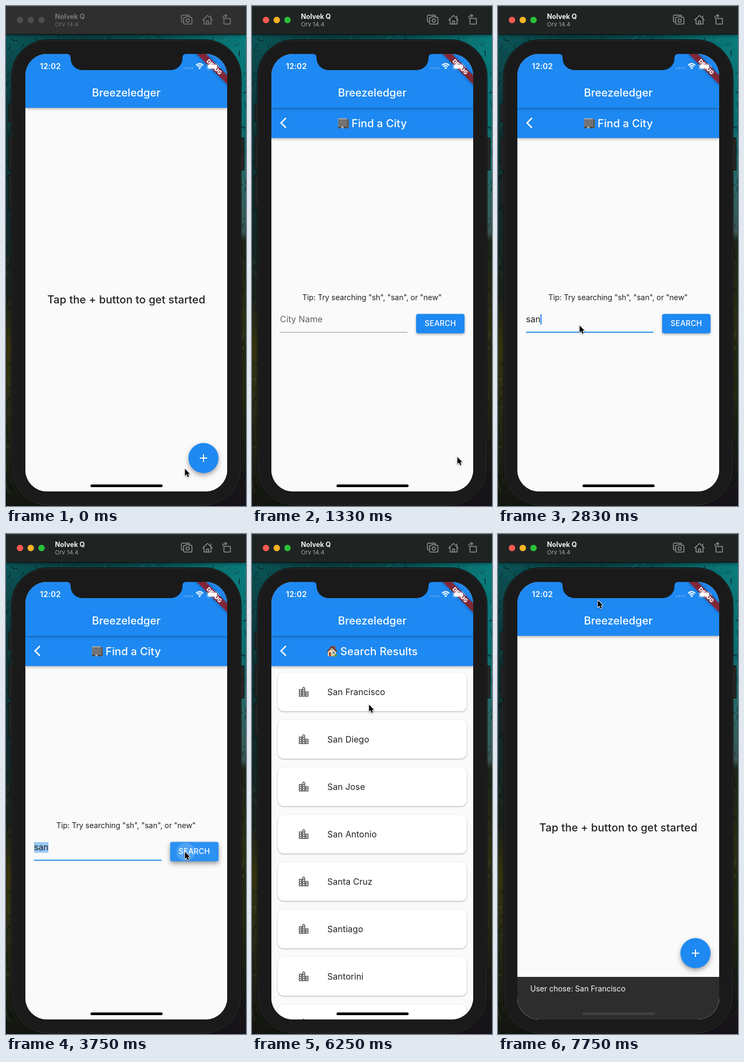
These frames come from a looping animation (446 px wide and 928 px high, 7830 ms). An HTML page with a canvas:

```html
<!DOCTYPE html>
<html lang="en">
<head>
<meta charset="utf-8">
<title>City search</title>
<style>
html, body { margin: 0; width: 100%; height: 100%; overflow: hidden; background: #14211f; }
canvas { display: block; width: 446px; height: 928px; }
</style>
</head>
<body>
<canvas id="stage"></canvas>
<script>
const W = 446, H = 928, LOOP = 7830, STEP = LOOP / 94;
const L = 36, R = 411, TOP = 89, BAR = 189, BOTTOM = 901;
const BLUE = '#1e89f2', PAPER = '#fafafa', INK = '#212121';
const SANS = 'Inter, "Liberation Sans", sans-serif';
const CITIES = ['San Francisco', 'San Diego', 'San Jose', 'San Antonio', 'Santa Cruz', 'Santiago', 'Santorini', 'Santa Fe'];
const CITY_ICON = new Path2D('M15 11V5l-3-3-3 3v2H3v14h18V11h-6zm-8 8H5v-2h2v2zm0-4H5v-2h2v2zm0-4H5V9h2v2zm6 8h-2v-2h2v2zm0-4h-2v-2h2v2zm0-4h-2V9h2v2zm0-4h-2V5h2v2zm6 12h-2v-2h2v2zm0-4h-2v-2h2v2z');
const ARROW = new Path2D('M.6 1V14L3.6 11.3L5.8 16.2L8 15.2L5.9 10.4H9.9Z');

// Event times in ms
const T = { active: 330, tap: 580, find: 670, focus: 2080, keys: [2250, 2420, 2580], search: 3600, results: 4250, pick: 6420, home: 6670, snack: 6840 };
// Pointer stops: time, x, y
const PATH = [[0, 332, 858], [420, 362, 842], [750, 364, 841], [1250, 381, 836], [1420, 381, 836], [2000, 151, 592],
  [2900, 151, 592], [3480, 332, 589], [5050, 332, 589], [6150, 217, 316], [6650, 216, 314], [7650, 185, 122]];

const canvas = document.getElementById('stage');
const dpr = window.devicePixelRatio || 1;
canvas.width = W * dpr;
canvas.height = H * dpr;
const c = canvas.getContext('2d');

const clamp = v => Math.max(0, Math.min(1, v));
const span = (t, start, length) => clamp((t - start) / length);
const slide = p => 1 - Math.pow(1 - p, 3.5);
const smooth = p => p * p * (3 - 2 * p);

function group(draw) { c.save(); draw(); c.restore(); }

function rect(x, y, w, h, color) {
  c.fillStyle = color;
  c.fillRect(x, y, w, h);
}

function round(x, y, w, h, r, color) {
  c.beginPath();
  c.roundRect(x, y, w, h, r);
  if (color) { c.fillStyle = color; c.fill(); }
}

function circle(x, y, r, color) {
  c.beginPath();
  c.arc(x, y, r, 0, 7);
  c.fillStyle = color;
  c.fill();
}

function poly(points, color) {
  c.beginPath();
  points.forEach(([x, y]) => c.lineTo(x, y));
  c.closePath();
  c.fillStyle = color;
  c.fill();
}

function shadow(alpha, blur, dy) {
  c.shadowColor = `rgba(0,0,0,${alpha})`;
  c.shadowBlur = blur * dpr;
  c.shadowOffsetY = dy * dpr;
}

function text(str, x, y, size, color, weight = 400, align = 'left', gap = 0) {
  c.font = `${weight} ${size}px ${SANS}`;
  c.letterSpacing = gap + 'px';
  c.textAlign = align;
  c.fillStyle = color;
  c.fillText(str, x, y);
}

function fade(x, y, w, h, stops, across) {
  const g = across ? c.createLinearGradient(x, 0, x + w, 0) : c.createLinearGradient(0, y, 0, y + h);
  stops.forEach(([at, color]) => g.addColorStop(at, color));
  rect(x, y, w, h, g);
}

function wallpaper() {
  fade(0, 50, 223, 878, [[0, '#0b5457'], [.08, '#0d4548'], [.16, '#0c3537'], [.4, '#122a29'], [.56, '#1b211a'], [.66, '#34330f'], [.8, '#272b15'], [1, '#12150f']]);
  fade(223, 50, 223, 878, [[0, '#0a7c7d'], [.2, '#0c6c6d'], [.32, '#2b6664'], [.42, '#3a5653'], [.44, '#1d2417'], [.62, '#292d13'], [.8, '#1f2412'], [1, '#16121a']]);
  fade(0, 50, W, 30, [[0, '#0b5457'], [.3, '#093c3f'], [.65, '#074e51'], [1, '#0a7c7d']], true);
  let seed = 17;
  const rnd = () => (seed = seed * 16807 % 2147483647) / 2147483647;
  c.lineCap = 'round';
  for (let i = 0; i < 320; i++) {
    const top = i < 90;
    const x = top ? rnd() * W : rnd() < .5 ? rnd() * 11 : W - rnd() * 10;
    const y = top ? 54 + rnd() * 40 : 60 + rnd() * 860;
    const light = rnd() < .3;
    const alpha = light ? .1 + rnd() * .3 : .25 + rnd() * .5;
    c.strokeStyle = light ? (y < 420 ? `rgba(60,135,135,${alpha})` : `rgba(95,98,50,${alpha})`) : `rgba(6,18,19,${alpha})`;
    c.lineWidth = .6 + rnd() * 1.4;
    c.beginPath();
    c.moveTo(x, y);
    c.lineTo(x + rnd() * 16 - 8, y + rnd() * 20 - 7);
    c.stroke();
  }
}

function toolbar(active) {
  group(() => {
    shadow(.6, 6, 2);
    rect(0, 0, W, 52, active ? '#1f2423' : '#2e2f2e');
  });
  rect(0, 0, W, 1, active ? '#3b403f' : '#414241');
  rect(0, 52, W, 1, '#0c1010');
  const lights = active ? ['#fe5951', '#f9b424', '#29c138'] : Array(3).fill('#4c4d4c');
  lights.forEach((color, i) => circle(26 + i * 20, 26, 6, color));
  text('Nolvek Q', 91, 24, 12.5, active ? '#f2f3f3' : '#777877', 700);
  text('Orv 14.4', 91, 38, 11, active ? '#a2a6a5' : '#6d6e6d');
  c.strokeStyle = active ? '#919796' : '#7a7b7a';
  c.lineWidth = 1.5;
  c.lineJoin = c.lineCap = 'round';
  c.stroke(new Path2D('M328.5 29.5H328Q326 29.5 326 27.5V19Q326 17 328 17H339Q341 17 341 19M332 21H334L335.5 19.5H339.5L341 21H343.5Q345.5 21 345.5 23V31.5Q345.5 33.5 343.5 33.5H332Q330 33.5 330 31.5V23Q330 21 332 21M340.7 27A3 3 0 1 1 334.7 27A3 3 0 1 1 340.7 27M365.5 26L374.5 17.5L383.5 26M368 24.5V33.5H381V24.5M380.5 22V18.5M372.5 33V28H376.5V33M405 23H416Q417 23 417 24V32.5Q417 33.5 416 33.5H406Q405 33.5 405 32.5V23M403 22Q402.5 18 407 18H410M407.5 15.5L410.2 18L407.5 20.5'));
}

function phone() {
  const buttons = [[5, 181, 34], [5, 244, 61], [5, 313, 61], [436, 244, 61]];
  buttons.forEach(([x, y, h]) => {
    round(x, y, 7, h, 2, '#080808');
    round(x + 1, y + 1, 5, h - 2, 1, '#282828');
  });
  round(9.5, 62, 428, 866, 69, '#080808');
  round(10.5, 63, 426, 864, 68, '#303030');
  round(11.5, 64, 424, 862, 67, '#1a1a1a');
}

function notch() {
  c.beginPath();
  c.moveTo(113, 88);
  c.lineTo(113, 89);
  c.quadraticCurveTo(120, 89, 120, 96);
  c.arcTo(120, 119, 143, 119, 22);
  c.arcTo(328, 119, 328, 96, 22);
  c.lineTo(328, 96);
  c.quadraticCurveTo(328, 89, 335, 89);
  c.lineTo(335, 88);
  c.fillStyle = '#1a1a1a';
  c.fill();
}

function banner() {
  group(() => {
    c.translate(R, TOP);
    c.rotate(Math.PI / 4);
    group(() => {
      shadow(.45, 6, 0);
      rect(-44, 28, 88, 12, 'rgba(152,28,34,.82)');
    });
    text('DEBUG', 0, 37.6, 10.2, '#fff', 900, 'center');
  });
}

function statusBar() {
  text('12:02', 63, 117, 14.5, '#fff', 600, 'left', .1);
  for (let i = 0; i < 4; i++) circle(331.8 + i * 4.8, 115.3, 1.5, 'rgba(255,255,255,.3)');
  c.strokeStyle = '#fff';
  c.lineCap = 'butt';
  c.lineWidth = 2.2;
  [9.3, 5.7].forEach(r => {
    c.beginPath();
    c.arc(359.8, 116.5, r, -2.37, -.77);
    c.stroke();
  });
  c.beginPath();
  c.moveTo(359.8, 117.6);
  c.arc(359.8, 117, 3.4, -2.37, -.77);
  c.fillStyle = '#fff';
  c.fill();
  c.lineWidth = 1;
  c.strokeStyle = 'rgba(255,255,255,.4)';
  round(373, 107, 21, 11, 3);
  c.stroke();
  round(374.8, 108.8, 17.4, 7.4, 1.6, '#fff');
  round(395.3, 110.5, 1.5, 4, 1, 'rgba(255,255,255,.5)');
}

function appBar(y, h) {
  group(() => {
    shadow(.34, 5, 1.5);
    rect(L, y, R - L, h, BLUE);
  });
}

function chevron() {
  c.strokeStyle = '#fff';
  c.lineWidth = 2.6;
  c.lineCap = 'butt';
  c.lineJoin = 'miter';
  c.stroke(new Path2D('M63 208L54 217L63 226'));
}

function officeIcon() {
  poly([[160, 209], [176, 209], [176, 227], [160, 227]], '#8b8a88');
  poly([[176, 209], [180, 211], [180, 227], [176, 227]], '#5d5d5e');
  rect(160, 208.5, 16, 1.5, '#b1afac');
  for (let row = 0; row < 4; row++) {
    for (let col = 0; col < 5; col++) rect(161 + col * 3, 211.3 + row * 3, 2, 1.8, '#4d5053');
  }
  rect(160, 223.5, 16, 3.5, '#514c49');
  rect(166, 223.5, 4, 3.5, '#a9b4b8');
}

function houseIcon() {
  rect(152, 208, 3, 7, '#96513f');
  poly([[141, 217], [149, 210], [156, 217], [156, 227], [141, 227]], '#ecd9b7');
  poly([[139, 218], [147, 208], [151, 208], [158.5, 218], [156, 219], [148.5, 211.5], [141, 219]], '#754139');
  rect(143, 219.5, 4, 7.5, '#a94632');
  rect(149.5, 218.5, 4.5, 4, '#5b98ae');
  circle(148.5, 215, 1.5, '#6d8c95');
  circle(155.5, 225.5, 2.4, '#5d9137');
  circle(151, 226.3, 1.6, '#72a43e');
}

function plusButton(y, t) {
  group(() => {
    shadow(.36, 9, 4);
    circle(367, y, 28, BLUE);
  });
  const p = span(t, T.tap, 300);
  if (p > 0 && p < 1) {
    group(() => {
      c.beginPath();
      c.arc(367, y, 28, 0, 7);
      c.clip();
      circle(367, y, 8 + 24 * p, `rgba(255,255,255,${.22 * (1 - p * p)})`);
    });
  }
  rect(360, y - 1, 14, 2, '#fff');
  rect(366, y - 7, 2, 14, '#fff');
}

function homePage(t) {
  rect(L, BAR, R - L, BOTTOM - BAR, PAPER);
  text('Tap the + button to get started', 223.5, 552, 20, INK, 500, 'center', .1);
  const p = slide(span(t, T.snack, 300));
  const top = BOTTOM - 79 * p;
  plusButton(Math.min(839, top - 44), t);
  if (p > 0) {
    rect(L, top, R - L, 80, '#2d2d2d');
    c.globalAlpha = span(t, T.snack + 90, 170);
    text('User chose: San Francisco', 60, top + 27, 14, '#fafafa');
    c.globalAlpha = 1;
  }
}

function searchButton(t) {
  const down = t >= T.search && t < 4100;
  group(() => {
    shadow(down ? .4 : .32, down ? 9 : 4, down ? 4 : 2);
    round(305, 571.5, 90, 36, 4, BLUE);
  });
  if (down) {
    group(() => {
      round(305, 571.5, 90, 36, 4);
      c.clip();
      rect(305, 571, 90, 37, `rgba(255,255,255,${.06 * (1 - span(t, 3850, 250))})`);
      const r = 8 + (Math.min(t, 3840) - T.search) * .06 + Math.max(0, t - 3840) * .28;
      circle(334, 590, r, `rgba(255,255,255,${.18 * (1 - span(t, 3840, 250))})`);
    });
  }
  text('SEARCH', 350, 594.3, 14, '#fff', 500, 'center', .2);
}

function findPage(t) {
  rect(L, BAR, R - L, BOTTOM - BAR, PAPER);
  appBar(BAR, 56);
  chevron();
  officeIcon();
  text('Find a City', 185, 224.7, 20, '#fff', 500, 'left', .1);
  text('Tip: Try searching "sh", "san", or "new"', 223, 546, 14, INK, 400, 'center', -.04);

  const typed = 'san'.slice(0, T.keys.filter(k => t >= k).length);
  const focus = t >= T.focus;
  c.font = `400 16px ${SANS}`;
  c.letterSpacing = '0px';
  const width = c.measureText(typed).width;
  if (t >= T.search) rect(52, 572, width, 19.5, '#97c8f6');
  if (typed) text(typed, 52, 587, 16, INK);
  else text('City Name', 52, 587, 16, '#646464');
  const blink = Math.floor(Math.max(0, t - T.keys[2]) / 500) % 2;
  if (focus && t < T.search && !blink) rect(52 + width, 572, 2, 19.5, BLUE);
  if (focus) rect(52, 604.5, 237, 2, BLUE);
  else rect(52, 605, 237, 1, '#8c8c8c');
  searchButton(t);
}

function resultsPage(t) {
  rect(L, BAR, R - L, BOTTOM - BAR, PAPER);
  CITIES.forEach((city, i) => {
    const y = 257 + i * 88;
    group(() => {
      shadow(.32, 2.5, 1);
      round(48, y, 351, 72, 11, '#fff');
    });
    const p = span(t, T.pick, 350);
    if (i === 0 && p > 0) {
      group(() => {
        round(48, y, 351, 72, 11);
        c.clip();
        rect(48, y, 351, 72, `rgba(0,0,0,${.04 * Math.min(1, p * 4)})`);
        circle(217, 316, 15 + 200 * p * p, `rgba(0,0,0,${.08 * (1 - p * .6)})`);
      });
    }
    group(() => {
      c.translate(84, y + 24);
      c.fillStyle = '#757575';
      c.fill(CITY_ICON);
    });
    text(city, 140, y + 42, 16, INK, 400, 'left', .05);
  });
  appBar(BAR, 56);
  chevron();
  houseIcon();
  text('Search Results', 164, 224.7, 20, '#fff', 500, 'left', .1);
}

// Draws one page above another; p is how far the upper one has come in.
function stack(below, above, p, t) {
  const w = R - L;
  if (p < 1) {
    group(() => {
      c.translate(-w / 3 * p, 0);
      below(t);
    });
  }
  if (p > 0) {
    group(() => {
      c.translate(w * (1 - p), 0);
      if (p < 1) {
        group(() => {
          shadow(.25, 14, 0);
          rect(L, BAR, w, BOTTOM - BAR, PAPER);
        });
      }
      above(t);
    });
  }
}

function pages(t) {
  if (t < T.results) stack(homePage, findPage, slide(span(t, T.find, 450)), t);
  else if (t < T.home) stack(findPage, resultsPage, slide(span(t, T.results, 450)), t);
  else stack(homePage, resultsPage, 1 - slide(span(t, T.home, 450)), t);
}

function screen(t) {
  group(() => {
    round(L, TOP, R - L, BOTTOM - TOP, 40);
    c.clip();
    rect(L, TOP, R - L, BOTTOM - TOP, PAPER);
    group(() => {
      c.beginPath();
      c.rect(L, BAR, R - L, BOTTOM - BAR);
      c.clip();
      pages(t);
    });
    appBar(TOP, BAR - TOP);
    text('Breezeledger', 223.5, 168, 20, '#fff', 500, 'center');
    banner();
    statusBar();
    round(157, 888, 134, 5, 2.5, t > T.snack + 100 ? '#414141' : '#000');
  });
  notch();
}

function pointer(t) {
  let i = 1;
  while (i < PATH.length - 1 && t > PATH[i][0]) i++;
  const [t0, x0, y0] = PATH[i - 1], [t1, x1, y1] = PATH[i];
  const p = smooth(span(t, t0, t1 - t0));
  group(() => {
    c.translate(x0 + (x1 - x0) * p, y0 + (y1 - y0) * p);
    c.lineJoin = 'round';
    c.lineWidth = 1.8;
    c.strokeStyle = '#fff';
    group(() => {
      shadow(.35, 3, 1);
      c.stroke(ARROW);
    });
    c.fillStyle = '#000';
    c.fill(ARROW);
  });
}

function frame(now) {
  const t = Math.floor((now % LOOP + 8) / STEP) * STEP % LOOP;
  c.setTransform(dpr, 0, 0, dpr, 0, 0);
  wallpaper();
  toolbar(t >= T.active);
  phone();
  screen(t);
  pointer(t);
}

const start = performance.now();
function loop() {
  frame(performance.now() - start);
  requestAnimationFrame(loop);
}
loop();
</script>
</body>
</html>
```
